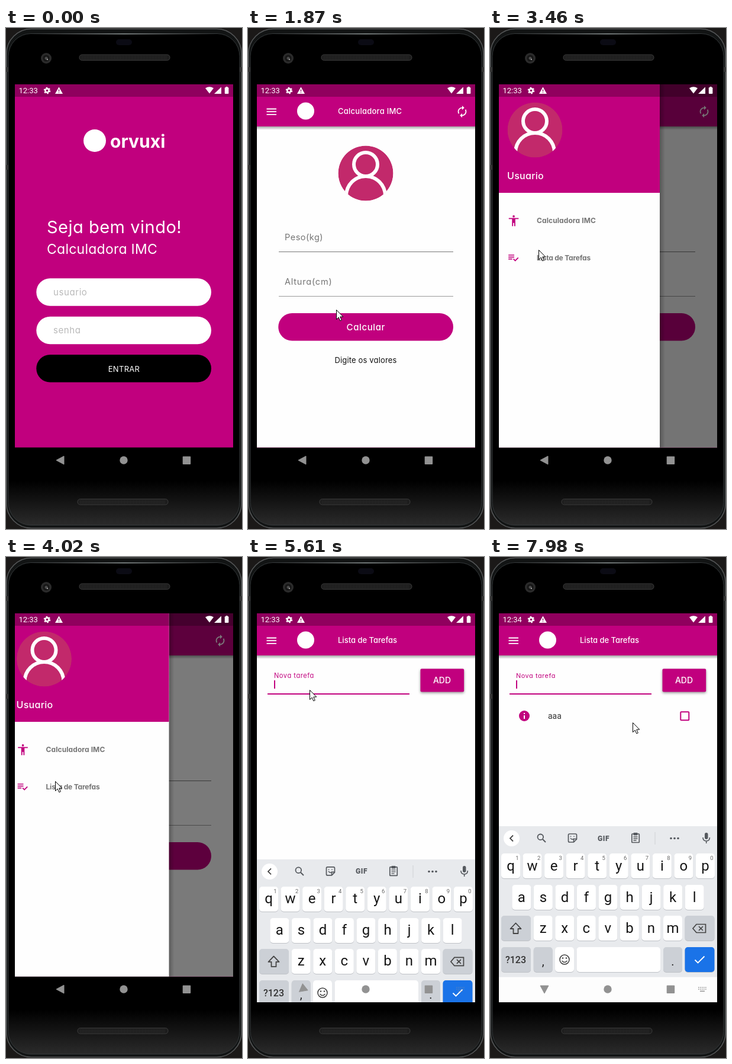
An HTML page that plays this animation: 399x845 px, repeating every 8000 ms.

```html
<!DOCTYPE html>
<html lang="pt">
<head>
<meta charset="utf-8">
<title>Calculadora IMC</title>
<style>
html, body { margin: 0; width: 100%; height: 100%; overflow: hidden; background: #1b1918; }
svg { display: block; width: 100%; height: 100%; }
text { font-family: Inter, Roboto, sans-serif; font-feature-settings: "cv11"; white-space: pre; }
text.ui { font-family: Roboto, "Noto Sans", sans-serif; font-feature-settings: normal; }
.raised { filter: drop-shadow(0 2px 2px rgba(0, 0, 0, .4)); }
</style>
</head>
<body>
<svg id="stage" viewBox="0 0 399 845" xmlns="http://www.w3.org/2000/svg"></svg>
<script>
const LOOP = 8000, PINK = '#c1007e', ROSE = '#c2296b', GREY = '#757575', ICON = '#55595e';

// ---- markup helpers ----
const rect = (x, y, w, h, fill, r = 0, more = '') =>
  `<rect x="${x}" y="${y}" width="${w}" height="${h}" rx="${r}" fill="${fill}" ${more}/>`;
const disc = (x, y, r, fill, more = '') =>
  `<circle cx="${x}" cy="${y}" r="${r}" fill="${fill}" ${more}/>`;
const path = (d, fill, more = '') => `<path d="${d}" fill="${fill}" ${more}/>`;
const line = (d, color, w = 1, more = '') =>
  path(d, 'none', `stroke="${color}" stroke-width="${w}" ${more}`);
const group = (id, body, more = '') => `<g id="${id}" ${more}>${body}</g>`;
const icon = (x, y, s, d, fill) => path(d, fill, `transform="translate(${x} ${y}) scale(${s})"`);
const text = (x, y, size, str, fill, o = {}) =>
  `<text x="${x}" y="${y}" font-size="${size}" fill="${fill}" font-weight="${o.w || 400}"
    letter-spacing="${o.ls || 0}" text-anchor="${o.mid ? 'middle' : 'start'}"
    class="${o.ui ? 'ui' : ''}" ${o.id ? `id="${o.id}"` : ''}>${str}</text>`;

// ---- phone body ----
const speaker = (x, y) =>
  rect(x, y, 153, 9.5, '#1d1d1d', 4.5, 'stroke="#3d3d3d"') +
  [3, 5, 7].map(d => line(`M${x + 4} ${y + d}h145`, '#333', 1, 'stroke-dasharray="1 1.5"')).join('');

function phone() {
  return rect(0, 0, 399, 845, '#1b1918') +
    rect(.8, 1.5, 397.4, 842, '#121414', 42, 'stroke="#545657" stroke-width="1.6"') +
    rect(4, 9.5, 391, 829, 'url(#body)', 38, 'stroke="#34383a"') +
    line('M40 10h319', 'url(#shine)', 1.5) +
    [[0, 66], [0, 231], [395, 66]].map(([x, y]) => rect(x, y, 4, 8, '#343434')).join('') +
    rect(186, 19, 27, 10, '#0b0b14', 5) +
    disc(68, 51, 9, '#2b2b2b') + disc(68, 51, 5.5, '#161616') + disc(68, 51, 2.5, '#4a4a4a') +
    disc(70, 53, 1.2, '#999') + speaker(124, 45) + speaker(121, 794.5);
}

// ---- screens ----
const avatar = (x, y) => `<g transform="translate(${x} ${y})" clip-path="url(#face)">` +
  disc(0, 0, 46.5, ROSE) +
  disc(0, -15, 20, 'none', 'stroke="#fff" stroke-width="6"') +
  line('M-33 48V38A33 33 0 0 1 33 38V48', '#fff', 6) + '</g>';

const pill = (y, fill) => rect(51.3, y, 295.7, 46.5, fill, 23.2);

const login = () => rect(15, 95, 369, 613, PINK) +
  disc(150, 190, 19, '#fff') +
  text(176, 202, 30, 'orvuxi', '#fff', { w: 700 }) +
  text(69, 346, 29, 'Seja bem vindo!', '#fff', { ls: .5 }) +
  text(69, 381, 23, 'Calculadora IMC', '#fff', { ls: .25 }) +
  pill(422.2, '#fff') + text(80, 451, 15, 'usuario', '#b9b9b9', { ls: .6 }) +
  pill(486.7, '#fff') + text(80, 515, 15, 'senha', '#b9b9b9', { ls: .6 }) +
  pill(551, '#000') + text(199.5, 580, 13, 'ENTRAR', '#fff', { ls: .3, mid: 1 });

const home = () => avatar(199, 245) +
  text(62, 358, 14.5, 'Peso(kg)', GREY, { ls: .5 }) + rect(52, 377, 295, 1, '#777') +
  text(62, 433, 14.5, 'Altura(cm)', GREY, { ls: .8 }) + rect(52, 452, 295, 1, '#999') +
  pill(481, PINK) +
  text(199.3, 510, 15, 'Calcular', '#fff', { w: 500, ls: .6, mid: 1 }) +
  text(199, 565, 13, 'Digite os valores', '#111', { ls: .15, mid: 1 });

const tasks = () => text(0, 0, 14.5, 'Nova tarefa', GREY, { ls: .75, id: 'label' }) +
  rect(33, 230, 240, 1, '#777', 0, 'id="rule"') +
  text(44, 220, 14, '', '#222', { ui: 1, id: 'typed' }) +
  rect(44, 208, 2, 14, PINK, 0, 'id="caret"') +
  rect(291.5, 188.5, 73.7, 39, PINK, 2, 'class="raised"') +
  text(328, 213, 14, 'ADD', '#fff', { w: 500, mid: 1 }) +
  group('item', disc(58, 268, 9, PINK) + rect(57, 263, 2, 2, '#fff') + rect(57, 267, 2, 6, '#fff') +
    text(98, 273, 14, 'aaa', '#333', { ui: 1 }) +
    rect(322.3, 261.3, 14, 14, 'none', 1, `stroke="${PINK}" stroke-width="2"`));

const header = () => rect(15, 166, 369, 6, 'url(#drop)') + rect(15, 95, 369, 71, PINK) +
  line('M31.5 136.5h16.5M31.5 141.2h16.5M31.5 145.9h16.5', '#fff', 1.8) +
  disc(97.5, 140, 14.5, '#fff') +
  text(152, 145, 13, '', '#fff', { w: 500, id: 'title' }) +
  group('reset', icon(351, 130, .92,
    'M12 6v3l4-4-4-4v3c-4.42 0-8 3.58-8 8 0 1.57.46 3.03 1.24 4.26L6.7 14.8' +
    'c-.45-.83-.7-1.79-.7-2.8 0-3.31 2.69-6 6-6zm6.76 1.74L17.3 9.2c.44.84.7 1.79.7 2.8 0 3.31-2.69 6-6 6' +
    'v-3l-4 4 4 4v-3c4.42 0 8-3.58 8-8 0-1.57-.46-3.03-1.24-4.26z', '#fff'));

const drawer = () => rect(287, 95, 9, 613, 'url(#side)') +
  rect(15, 95, 272, 613, '#fefefe') + rect(15, 95, 272, 183, PINK) + avatar(76, 172) +
  text(29, 255, 16, 'Usuario', '#fff', { w: 500, ls: .3 }) +
  icon(29, 314, .92, 'M12 2a2 2 0 1 1 0 4a2 2 0 1 1 0-4zm9 7h-6v13h-2v-6h-2v6H9V9H3V7h18v2z', PINK) +
  text(79, 329, 12, 'Calculadora IMC', GREY, { w: 700, ls: .1 }) +
  icon(29.5, 377.3, .82, 'M14 10H2v2h12v-2zm0-4H2v2h12V6zM2 16h8v-2H2v2z' +
    'm19.5-4.5L23 13l-6.99 7-4.51-4.5L13 14l3.01 3 5.49-5.5z', PINK) +
  text(79, 391.5, 12, 'Lista de Tarefas', GREY, { w: 700, ls: -.2 });

const status = () => rect(15, 95, 369, 21, 'rgba(0,0,0,.255)') +
  text(21.5, 110, 13, '', '#fff', { ui: 1, id: 'clock' }) +
  disc(69.5, 105.5, 3.1, 'none', 'stroke="#fff" stroke-width="2.6"') +
  disc(69.5, 105.5, 4.9, 'none', 'stroke="#fff" stroke-width="1.8" stroke-dasharray="2.6 2.53"') +
  path('M89.5 99.5L96 111H83Z', '#fff') + line('M89.5 103.5v3.5M89.5 108.2v1.4', '#900060', 1.3) +
  path('M337 101.5Q344 97 351 101.5L344 110.5Z', '#fff') + path('M364 99.5V111H352Z', '#fff') +
  rect(369.8, 100.3, 6.6, 10.7, '#fff', 1) + rect(371.6, 99, 3, 2, '#fff');

// ---- keyboard, drawn from its own top edge ----
const KEY_W = 32, PITCH = 36.55;
function key(x, y, w, fill = '#fff') {
  return rect(x, y + 1, w, 42, '#bfc2c7', 5) + rect(x, y, w, 42, fill, 5);
}
function letters(str, x0, y, hints) {
  return [...str].map((c, i) => {
    const x = x0 + i * PITCH;
    return key(x, y, KEY_W) + text(x + 16, y + 28.5, 24, c, '#151515', { ui: 1, mid: 1 }) +
      (hints ? text(x + 27, y + 11, 9.5, (i + 1) % 10, '#666', { ui: 1, mid: 1 }) : '');
  }).join('');
}
function toolbar() {
  const s = (d, w = 1.7) => line(d, ICON, w, 'stroke-linejoin="round"');
  return disc(85.3, 18.3, 4.8, 'none', `stroke="${ICON}" stroke-width="1.8"`) + s('M89 22l5 5', 2) +
    s('M134.5 13h10q2 0 2 2v7l-5 5h-7q-2 0-2-2v-10q0-2 2-2zM146 21.5h-4.5v5') +
    s('M136 20q2.5 4 6 1M136.5 16.5v1.5M142 16.5v1.5', 1.4) +
    text(192, 24.5, 12, 'GIF', ICON, { ui: 1, w: 900, mid: 1, ls: .6 }) +
    rect(239.8, 13, 12.5, 14.5, 'none', 1, `stroke="${ICON}" stroke-width="1.7"`) +
    rect(242.5, 11, 7, 4.5, ICON, 1) + s('M242.5 18h7M242.5 21h7M242.5 24h5', 1.3) +
    rect(278.5, 10, 1, 21, '#cdd0d4') + [306, 312, 318].map(x => disc(x, 20.5, 1.8, ICON)).join('');
}
function keyboard() {
  const DIM = '#ccd0d6', G = '#444';
  return rect(15, 0, 369, 297, '#e8eaed') +
    disc(36.5, 20.5, 13.5, '#fff') + line('', G, 1.8, 'id="chevron"') + group('tools', toolbar()) +
    rect(363, 11, 5.5, 11, ICON, 2.7) + line('M360 19q0 6 5.7 6t5.7-6M365.7 25v4', ICON, 1.6) +
    letters('qwertyuiop', 19, 46, true) + letters('asdfghjkl', 37.3, 99) +
    key(19, 151, 50, DIM) + line('M43.5 163.5l-9 9.5h5v8h8v-8h5z', G, 1.8, 'stroke-linejoin="round"') +
    letters('zxcvbnm', 73.7, 151) + key(329.5, 151, 50, DIM) +
    line('M349 165.5h15.5v14H349l-6-7zM353 169l7 7M360 169l-7 7', G, 1.7) +
    key(19, 204, 50, DIM) + text(43.5, 231, 16, '?123', '#333', { ui: 1, w: 500, mid: 1 }) +
    key(73.7, 204, KEY_W, DIM) + text(89.7, 235, 20, ',', '#222', { ui: 1, mid: 1 }) +
    key(110, 204, KEY_W) + disc(126, 225, 8, 'none', `stroke="${G}" stroke-width="1.6"`) +
    disc(123, 222.5, 1.3, G) + disc(129, 222.5, 1.3, G) + line('M121.5 227q4.5 5 9 0', G, 1.6) +
    key(146.5, 204, 141.5) + key(293, 204, KEY_W, DIM) + text(309, 235, 20, '.', '#222', { ui: 1, mid: 1 }) +
    key(329.5, 204, 50, '#1a73e8') + line('M346.5 225.5l5 5 11-11', '#fff', 1.9) +
    rect(15, 254.5, 369, 43, '#fdfdfd');
}

const nav = () => path('M85 729L98 722V736Z', '#929292',
    'id="back" stroke="#929292" stroke-linejoin="round"') +
  disc(199, 729, 6.7, '#929292') + rect(298.7, 722.5, 13.5, 13.5, '#929292', 1) +
  group('keys', [726, 729].map(y => line(`M352 ${y}h14`, '#929292', 1.6, 'stroke-dasharray="1.6 1.4"')).join('') +
    line('M355 732.3h8', '#929292', 1.5));

const stop = (o, c, a = 1) => `<stop offset="${o}" stop-color="${c}" stop-opacity="${a}"/>`;
const grad = (id, dir, stops) => `<linearGradient id="${id}" ${dir}>${stops}</linearGradient>`;
const DOWN = 'x1="0" y1="0" x2="0" y2="1"';
const clip = (id, body) => `<clipPath id="${id}">${body}</clipPath>`;
const stage = document.getElementById('stage');
stage.innerHTML = '<defs>' +
  grad('body', DOWN, stop(0, '#000') + stop(.91, '#000') + stop(1, '#2b2b2b')) +
  grad('shine', 'gradientUnits="userSpaceOnUse" x1="40" y1="0" x2="359" y2="0"',
    stop(0, '#777', 0) + stop(.5, '#8c9494') + stop(1, '#777', 0)) +
  grad('drop', DOWN, stop(0, '#000', .35) + stop(1, '#000', 0)) +
  grad('side', '', stop(0, '#000', .25) + stop(1, '#000', 0)) +
  clip('screen', rect(15, 95, 369, 612.6, '#000')) + clip('glass', rect(15, 95, 369, 656, '#000')) +
  clip('face', disc(0, 0, 46.5, '#000')) + '</defs>' +
  phone() +
  `<g clip-path="url(#screen)">` + login() +
  group('app', rect(15, 95, 369, 613, '#fefefe') + group('home', home()) + group('tasks', tasks()) + header()) +
  rect(15, 95, 369, 613, '#000', 0, 'id="scrim"') + group('drawer', drawer()) + '</g>' +
  status() + `<g clip-path="url(#glass)">` + group('board', keyboard()) + '</g>' + nav() +
  path('M.5.5V16.5L4.2 13L6.8 18.8L9.3 17.7L6.8 12H11.8Z', '#fff', 'id="mouse" stroke="#000"');

// ---- motion ----
const el = id => document.getElementById(id);
const set = (id, attrs) => { for (const k in attrs) el(id).setAttribute(k, attrs[k]); };
const move = (id, x, y = 0, more = '') => set(id, { transform: `translate(${x} ${y}) ${more}` });
const show = (id, on) => { el(id).style.display = on ? '' : 'none'; };
const say = (id, str) => { if (el(id).textContent !== str) el(id).textContent = str; };
const part = (t, a, d) => Math.min(1, Math.max(0, (t - a) / d));
const smooth = p => p * p * (3 - 2 * p);
const outCubic = p => 1 - (1 - p) ** 3;

// cubic-bezier(.25, .1, .25, 1)
function ease(p) {
  const curve = (u, a, b) => 3 * u * (1 - u) ** 2 * a + 3 * u * u * (1 - u) * b + u ** 3;
  let lo = 0, hi = 1;
  for (let i = 0; i < 20; i++) {
    const mid = (lo + hi) / 2;
    if (curve(mid, .25, .25) < p) lo = mid; else hi = mid;
  }
  return curve(lo, .1, 1);
}

// pointer stops: time, x, y
const STOPS = [
  [250, 240, 762], [520, 150, 650], [760, 176, 563], [870, 181, 577], [1640, 181, 577],
  [2360, 50, 158], [2490, 50, 158], [2700, 43, 151], [3130, 43, 151], [3440, 82, 374],
  [4000, 83, 378], [4400, 105, 422], [4620, 105, 422], [4930, 93, 271], [5340, 104, 224],
  [6700, 104, 224], [7050, 372, 208], [7180, 343, 206], [7340, 341, 206], [7700, 268, 292], [7950, 241, 279]
];
function pointer(t) {
  const i = STOPS.findIndex(s => s[0] > t);
  if (i < 0) return STOPS[STOPS.length - 1].slice(1);
  if (i === 0) return STOPS[0].slice(1);
  const [a, x, y] = STOPS[i - 1], [b, u, v] = STOPS[i];
  const p = smooth((t - a) / (b - a));
  return [x + (u - x) * p, y + (v - y) * p];
}

function draw(t) {
  const enter = part(t, 1330, 150);
  set('app', { opacity: enter });
  move('app', 0, 60 * (1 - outCubic(enter)));

  const open = outCubic(part(t, 2900, 300)) - smooth(part(t, 3990, 250));
  show('drawer', t > 2820 && t < 4270);
  move('drawer', -272 * (1 - open));
  set('scrim', { opacity: .54 * open });

  const page = ease(part(t, 4158, 800)), onTasks = page >= .5;
  move('home', -369 * page);
  move('tasks', 369 * (1 - page));
  say('title', onTasks ? 'Lista de Tarefas' : 'Calculadora IMC');
  set('title', { 'letter-spacing': onTasks ? 0 : .25 });
  show('reset', !onTasks);

  const focus = t >= 5480, lift = smooth(part(t, 5480, 150));
  move('label', 44, 211 - 7 * lift, `scale(${1 - .25 * lift})`);
  set('label', { fill: focus ? PINK : GREY });
  set('rule', { fill: focus ? PINK : '#777', height: focus ? 2 : 1 });
  const typing = t >= 6340 && t < 7290;
  const count = typing ? 1 + (t >= 6540) + (t >= 6680) : 0;
  say('typed', 'a'.repeat(count));
  set('caret', { x: 44 + count * 7.6 });
  show('caret', focus && !(t >= 6140 && t < 6340));
  show('item', t >= 7290);

  const turn = part(t, 5483, 300), rise = outCubic(turn);
  show('board', turn > 0);
  move('board', 0, 751 - 297 * rise);
  show('tools', !typing);
  set('chevron', { d: typing ? 'M34 15.5l5 5-5 5' : 'M39 15.5l-5 5 5 5' });
  set('back', { transform: `rotate(${-90 * turn} 92 729)` });
  set('keys', { opacity: turn });

  say('clock', t < 6900 ? '12:33' : '12:34');
  show('mouse', t >= 250);
  move('mouse', ...pointer(t).map(Math.round));
}

const start = performance.now();
function tick() {
  draw((performance.now() - start) % LOOP);
  requestAnimationFrame(tick);
}
tick();
</script>
</body>
</html>
```
